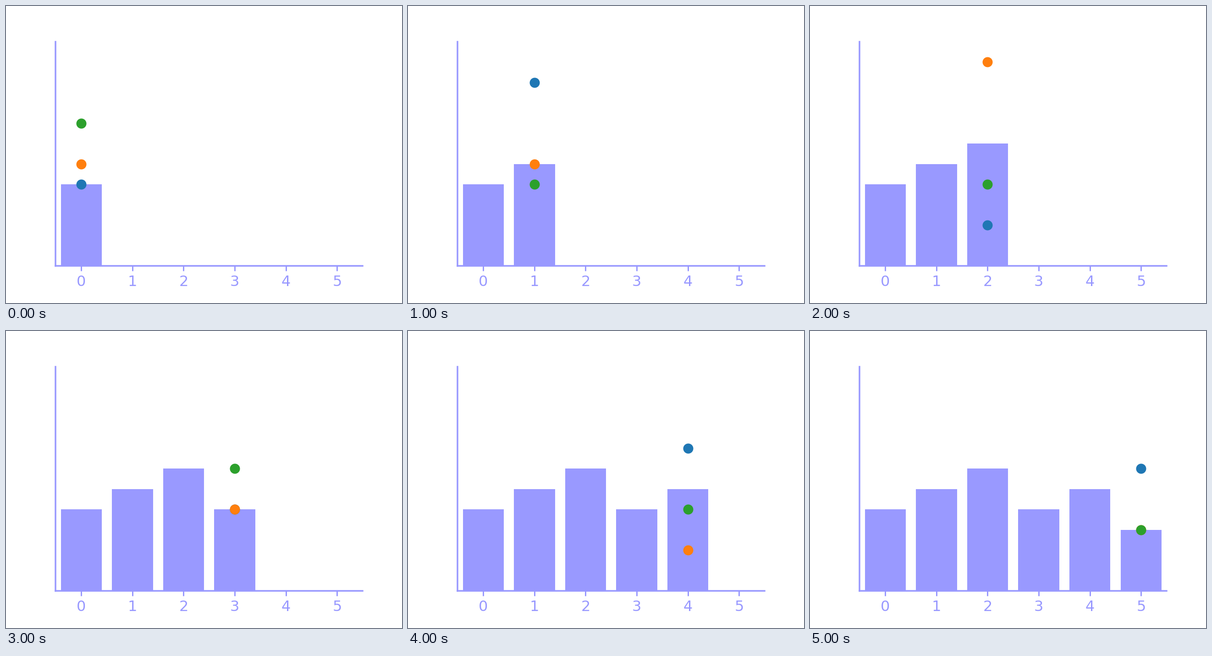
These frames come from a looping animation (864 by 648 pixels, 6 s). A matplotlib script:

```python
import matplotlib.pyplot as plt
from matplotlib.animation import FuncAnimation

W, H, DPI = 864, 648, 144
TINT = "#9999ff"

bar_heights = [4, 5, 6, 4, 5, 3]
series = {
    "C0": [4, 9, 2, 4, 7, 6],
    "C1": [5, 5, 10, 4, 2, 3],
    "C2": [7, 4, 4, 6, 4, 3],
}

plt.rcParams["font.family"] = "DejaVu Sans"
fig = plt.figure(figsize=(W / DPI, H / DPI), dpi=DPI, facecolor="white")
ax = fig.add_axes([108.48 / W, 81 / H, 669.6 / W, 489.24 / H])
ax.set_xlim(-0.5, 5.5)
ax.set_ylim(0, 11)

for side in ("top", "right"):
    ax.spines[side].set_visible(False)
for side in ("left", "bottom"):
    ax.spines[side].set_color(TINT)
    ax.spines[side].set_linewidth(1.75)

ax.set_yticks([])
ax.set_xticks(range(len(bar_heights)))
ax.tick_params(axis="x", colors=TINT, length=5.5, width=1.5, pad=4.5, labelsize=16)

bars = ax.bar(range(len(bar_heights)), bar_heights, width=0.8, color=TINT, linewidth=0)
dots = {
    color: ax.plot([], [], "o", color=color, markersize=10, markeredgewidth=1)[0]
    for color in series
}


def draw(step):
    for i, bar in enumerate(bars):
        bar.set_visible(i <= step)
    for color, dot in dots.items():
        dot.set_data([step], [series[color][step]])
    return [*bars, *dots.values()]


anim = FuncAnimation(
    fig, draw, frames=len(bar_heights), init_func=lambda: draw(0),
    interval=1000, repeat=True, repeat_delay=0, blit=False,
)
plt.show()
```
